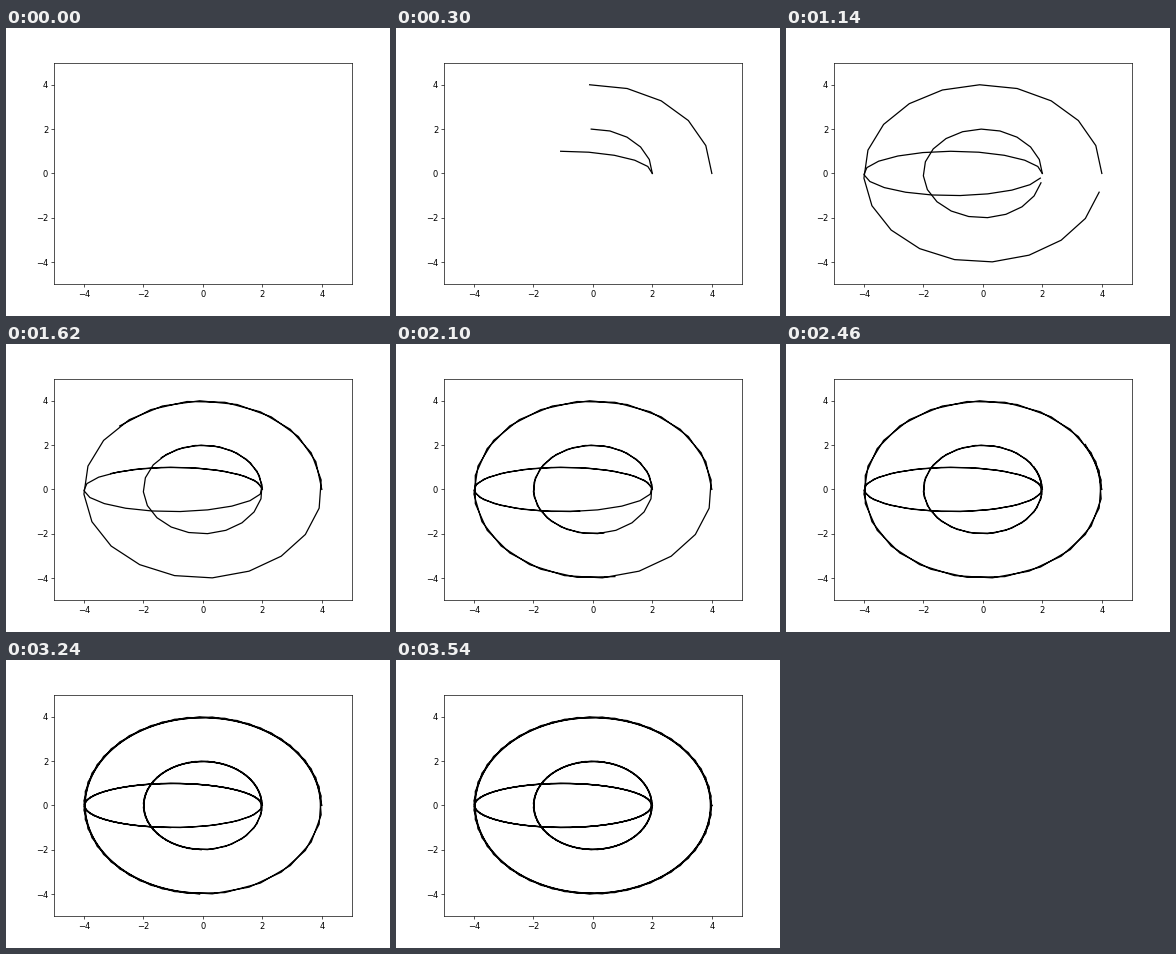
Animation of 384x288 px, one loop 3600 ms. Source, as a matplotlib script:

```python
import numpy as np
import matplotlib.pyplot as plt
from matplotlib.animation import FuncAnimation

FRAMES = 60
INTERVAL = 60
TURNS = 3

# centre x, horizontal radius, vertical radius
ORBITS = [(0, 2, 2), (0, 4, 4), (-1, 3, 1)]

angles = np.linspace(0, 2 * np.pi * TURNS, FRAMES)

fig, ax = plt.subplots(figsize=(6.4, 4.8), dpi=60)
ax.set_xlim(-5, 5)
ax.set_ylim(-5, 5)
ax.set_xticks(range(-4, 5, 2))
ax.set_yticks(range(-4, 5, 2))

trails = [ax.plot([], [], color="black", lw=1.5)[0] for _ in ORBITS]


def update(frame):
    t = angles[:frame + 1]
    for trail, (cx, rx, ry) in zip(trails, ORBITS):
        trail.set_data(cx + rx * np.cos(t), ry * np.sin(t))
    return trails


def reset():
    return update(0)


anim = FuncAnimation(fig, update, frames=FRAMES, init_func=reset,
                     interval=INTERVAL, repeat=True, repeat_delay=0)
plt.show()
```
